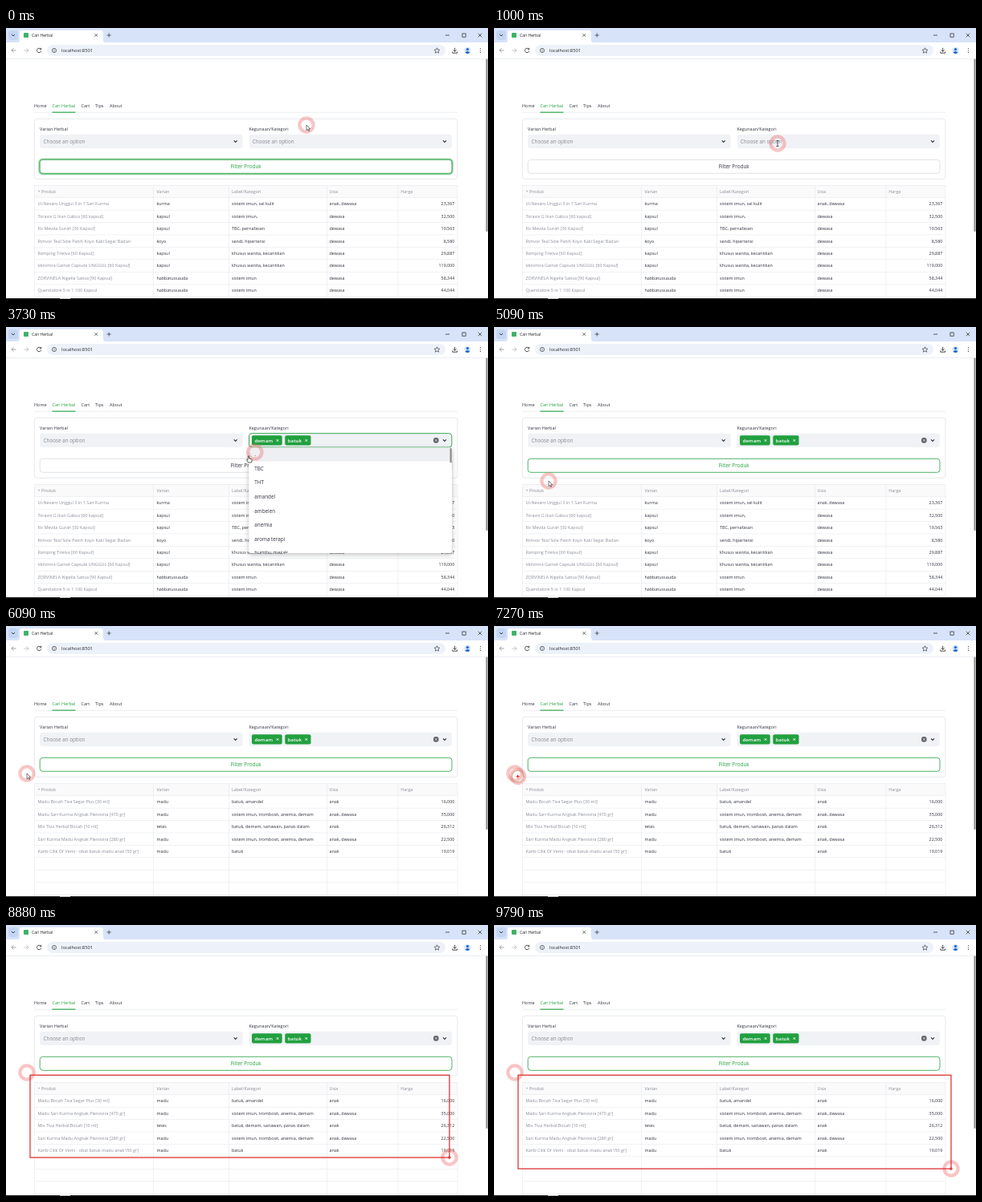
These frames come from a looping animation (600 by 338 pixels, 9.82 s). An HTML page:

```html
<!DOCTYPE html>
<html lang="id">
<head>
<meta charset="utf-8">
<title>Cari Herbal</title>
<style>
  html, body { margin: 0; width: 100%; height: 100%; overflow: hidden; background: #fff; }
  svg { display: block; }
  text { font-family: "Open Sans", "Noto Sans", sans-serif; white-space: pre; }
  #popup { filter: drop-shadow(0 2px 3px rgba(0, 0, 0, .25)); }
</style>
</head>
<body>
<svg id="stage" width="600" height="338" viewBox="0 0 600 338">
  <g id="browser"></g>
  <g id="page"></g>
  <g id="table"></g>
  <g id="button"></g>
  <g id="select"></g>
  <g id="popup"></g>
  <g id="overlay"></g>
</svg>
<script>
const LOOP = 9820;
const GREEN = '#22a03f', INK = '#31333f', MUTED = '#8b8e98', LINE = '#e6e8ec', FIELD = '#f0f2f6';
const CLICK_SELECT = 1000, PICK_FIRST = 2110, PICK_SECOND = 3010, CLICK_FILTER = 4330,
      RESULTS = 5600, PEN_ON = 6400, DRAG = 7270, LAG_FROM = 8240, LAG_TO = 8510;

const allProducts = [
  ['Ul-Nevaro Unggul 3 in 1 Sari Kurma', 'kurma', 'sistem imun, sel kulit', 'anak, dewasa', '23,367'],
  ['Toravix G Ikan Gabus [60 kapsul]', 'kapsul', 'sistem imun,', 'dewasa', '32,500'],
  ['Ro Mevda Gurah [30 Kapsul]', 'kapsul', 'TBC, pernafasan', 'dewasa', '19,563'],
  ['Rimvor Teal Sole Patch Koyo Kaki Segar Badan', 'koyo', 'sendi, hipertensi', 'dewasa', '8,580'],
  ['Ramping Tirelva [60 Kapsul]', 'kapsul', 'khusus wanita, kecantikan', 'dewasa', '29,887'],
  ['Velomira Gamat Capsule UNGGUL [60 Kapsul]', 'kapsul', 'khusus wanita, kecantikan', 'dewasa', '119,000'],
  ['ZORVINELA Nigella Sativa [90 Kapsul]', 'habbatussauda', 'sistem imun', 'dewasa', '58,344'],
  ['Quendalore 5 in 1 100 Kapsul', 'habbatussauda', 'sistem imun', 'dewasa', '44,044']
];
const filteredProducts = [
  ['Madu Bocah Tiva Segar Plus [30 ml]', 'madu', 'batuk, amandel', 'anak', '16,000'],
  ['Madu Sari Kurma Angkak Plenovira [470 gr]', 'madu', 'sistem imun, trombosit, anemia, demam', 'anak, dewasa', '35,000'],
  ['Mix Tiva Herbal Bocah [10 ml]', 'tetes', 'batuk, demam, sariawan, panas dalam', 'anak', '26,312'],
  ['Sari Kurma Madu Angkak Plenovira [280 gr]', 'madu', 'sistem imun, trombosit, anemia, demam', 'anak, dewasa', '22,500'],
  ['Karib Cilik Or Vemi - obat batuk madu anak150 gr]', 'madu', 'batuk', 'anak', '19,019']
];
const options = ['.', 'TBC', 'THT', 'amandel', 'ambeien', 'anemia', 'aroma terapi', 'batuk',
  'bumbu masak', 'demam', 'diabetes', 'hipertensi', 'kecantikan', 'sariawan', 'sendi'];

// Pointer path: time, x, y
const path = [
  [0, 374, 121], [300, 374, 121], [850, 353, 144], [3560, 353, 144], [3730, 310, 156],
  [3790, 302, 162], [4000, 290, 168], [4120, 274, 173], [4400, 274, 173], [5040, 68, 192],
  [5180, 68, 192], [5300, 36, 186], [5400, 26, 184], [7240, 26, 184], [7270, 29.5, 187.5],
  [7500, 60, 196], [8240, 485, 275], [8360, 494, 275], [8510, 494, 275], [8880, 552, 290],
  [9420, 569, 304], [LOOP, 569, 304]
];

const $ = id => document.getElementById(id);
const text = (x, y, s, size = 5.5, fill = INK, extra = '') =>
  `<text x="${x}" y="${y}" font-size="${size}" fill="${fill}" ${extra}>${s}</text>`;
const rect = (x, y, w, h, fill, extra = '') =>
  `<rect x="${x}" y="${y}" width="${w}" height="${h}" fill="${fill}" ${extra}/>`;
const stroke = (d, color, width = 1, extra = '') =>
  `<path d="${d}" fill="none" stroke="${color}" stroke-width="${width}" ${extra}/>`;
const circle = (x, y, r, fill, extra = '') =>
  `<circle cx="${x}" cy="${y}" r="${r}" fill="${fill}" ${extra}/>`;
const cross = (x, y, r, color, width) =>
  stroke(`M${x - r} ${y - r}l${2 * r} ${2 * r}M${x + r} ${y - r}l${-2 * r} ${2 * r}`, color, width);
const chevron = (x, y, r, color, width) =>
  stroke(`M${x - r} ${y - r / 2}l${r} ${r}l${r} ${-r}`, color, width);

function drawBrowser() {
  const dark = '#3c4043';
  $('browser').innerHTML =
    rect(0, 0, 600, 18, '#d7e3f9') +
    rect(3, 3, 12, 12, '#c3d5f3', 'rx="3"') + chevron(9, 9, 2, dark, 1) +
    `<path d="M14 18q3 0 3-3V6q0-3 3-3h98q3 0 3 3v9q0 3 3 3z" fill="#fff"/>` +
    rect(22, 6, 6, 6, '#3fb26a', 'rx="1"') +
    text(32, 11, 'Cari Herbal', 5, '#1f1f1f') +
    cross(112.3, 9, 1.8, dark, .8) +
    stroke('M125.7 9h5M128.2 6.5v5', dark, .8) +
    stroke('M547 9h5', '#222', .7) +
    rect(568, 7, 4.2, 4.2, 'none', 'stroke="#222" stroke-width=".7"') +
    cross(590, 9, 2.2, '#222', .7) +
    rect(0, 18, 600, 20, '#fff') +
    rect(51, 21, 496, 14, '#edf1f9', 'rx="7"') +
    stroke('M12.5 28h-5.5M9.5 25.3L6.8 28l2.7 2.7', '#8a8d91', .8) +
    stroke('M22.5 28h5.5M25.3 25.3L28 28l-2.7 2.7', '#b5b8bc', .8) +
    stroke('M43.3 26.3A2.7 2.7 0 1 0 43.8 28.6M43.8 24.8v2h-2', dark, .9) +
    circle(60, 28, 2.6, 'none', `stroke="${dark}" stroke-width=".7"`) +
    stroke('M60 27.6v1.8M60 26.2v.7', dark, .7) +
    text(69, 30, 'localhost:8501', 5.8, '#26282b') +
    stroke('M536.5 24.8l1 2.2 2.4.2-1.8 1.6.5 2.4-2.1-1.2-2.1 1.2.5-2.4-1.8-1.6 2.4-.2z', dark, .7) +
    stroke('M558.7 24.8v4.4M556.7 27.4l2 2 2-2M555.8 29.5v1.7h5.8v-1.7', '#333', .9) +
    circle(574.5, 28, 4, '#d2e3fc') + circle(574.5, 26.6, 1.6, '#1a66c9') +
    `<path d="M571.6 30.7q2.9-3.4 5.8 0q-2.9 2.4-5.8 0z" fill="#1a66c9"/>` +
    [25.6, 28, 30.4].map(y => circle(590.5, y, .6, dark)).join('') +
    rect(0, 38, 600, .7, '#e1e5ec');
}

function drawPage() {
  const nav = [[35, 'Home'], [57.5, 'Cari Herbal'], [93.5, 'Cart'], [111, 'Tips'], [129, 'About']];
  $('page').innerHTML =
    nav.map(([x, s], i) => text(x, 98.8, s, 5.5, i === 1 ? GREEN : INK)).join('') +
    rect(35, 104.8, 527, .8, '#e6e8ec') + rect(57.5, 104.6, 29, 1.1, GREEN) +
    rect(35.4, 113.3, 526.6, 75, 'none', 'rx="3.5" stroke="#dcdee3" stroke-width=".7"') +
    text(42, 127.8, 'Varian Herbal') + text(302.4, 127.8, 'Kegunaan/Kategori') +
    rect(42, 132.7, 252.7, 17.4, FIELD, 'rx="3.5"') +
    text(46.6, 143.6, 'Choose an option', 6.3, '#85878f') +
    chevron(285.7, 141.3, 2, INK, 1.2) +
    rect(597.4, 38.5, 2.2, 215.5, '#8e8e8e', 'rx="1"') +
    rect(0, 337, 600, 1, '#202124') + rect(67, 337, 13, 1, '#b9bcc0');
}

function drawTable(rows) {
  const top = 196, pitch = 15.42, left = [39.5, 187.4, 281, 402.5, 491.3];
  const heads = ['+ Produk', 'Varian', 'Label/Kategori', 'Usia', 'Harga'];
  let out = rect(35.3, top, 526.7, pitch, '#fafafb');
  for (let i = 0; i < 10; i++) out += rect(35.3, top + i * pitch, 526.7, .6, LINE);
  for (const x of [35.3, 183.4, 277.4, 399, 487.7, 561.7]) out += rect(x, top, .6, 141, LINE);
  heads.forEach((s, i) => out += text(left[i], 205.8, s, 5.4, MUTED));
  rows.forEach((row, r) => row.forEach((s, c) => {
    const y = +(221.3 + r * pitch).toFixed(1);
    out += c === 4 ? text(558.3, y, s, 5.4, INK, 'text-anchor="end"')
                   : text(left[c], y, s, 5.4, c ? INK : MUTED);
  }));
  $('table').innerHTML = out;
}

function drawButton(mode) {
  const on = mode !== 'idle';
  $('button').innerHTML =
    (mode === 'ring' ? rect(41.6, 163.6, 514, 18.4, 'none',
      `rx="4" stroke="${GREEN}" stroke-opacity=".5" stroke-width="2.4"`) : '') +
    rect(42.2, 164.3, 512.8, 17, '#fff', `rx="3.5" stroke="${on ? GREEN : '#d8dade'}" stroke-width=".8"`) +
    text(298.7, 175.2, 'Filter Produk', 6.4, on ? GREEN : INK, 'text-anchor="middle"');
}

function chip(x, w, s) {
  return rect(x, 135.2, w, 12.4, GREEN, 'rx="2"') +
    text(x + 3.5, 143.6, s, 6.1, '#fff', 'font-weight="600"') +
    cross(x + w - 5.7, 141.5, 1.3, '#fff', .9);
}

function drawSelect(open, query, chips) {
  const inputX = [306, 347.5, 383.5][chips];
  let out = rect(302.5, 132.7, 252.4, 17.4, FIELD,
    open ? `rx="3.5" stroke="${GREEN}" stroke-width=".9"` : 'rx="3.5"');
  if (chips > 0) out += chip(306, 37.7, 'demam');
  if (chips > 1) out += chip(347.3, 32.2, 'batuk');
  if (!chips && !query) out += text(306.8, 143.6, 'Choose an option', 6.3, '#85878f');
  if (query) out += text(inputX, 143.6, query, 6.3, INK, 'id="query"');
  if (chips || query) out += circle(535.3, 141.4, 3.3, '#5d5f68') + cross(535.3, 141.4, 1.2, '#fff', .8);
  out += chevron(546, 141.3, 2, INK, 1.2);
  $('select').innerHTML = out;
  if (query) {
    const caret = inputX + $('query').getComputedTextLength() + .3;
    $('select').innerHTML += rect(caret, 137.3, .6, 8.2, INK);
  }

  const taken = ['demam', 'batuk'].slice(0, chips);
  const items = options.filter(o => o.includes(query) && !taken.includes(o)).slice(0, 8);
  const pitch = 17.6, height = Math.min(131.5, items.length * pitch - .4);
  $('popup').innerHTML = !open ? '' :
    rect(302.3, 150.6, 252.7, height, '#fff', 'rx="2"') +
    `<svg x="302.3" y="150.6" width="252.7" height="${height}" overflow="hidden">` +
    rect(0, 0, 252.7, 17, '#eeeff2') +
    items.map((s, i) => text(7, 10.6 + i * pitch, s, 6.3)).join('') +
    (items.length > 7 ? rect(250.3, .6, 2.2, 18, '#8e8e8e') : '') + '</svg>';
}

function pointAt(t) {
  let i = 1;
  while (i < path.length - 1 && path[i][0] < t) i++;
  const [t0, x0, y0] = path[i - 1], [t1, x1, y1] = path[i];
  const k = Math.min(1, (t - t0) / (t1 - t0));
  return [x0 + (x1 - x0) * k, y0 + (y1 - y0) * k];
}

const halo = (x, y) => circle(x, y, 8.6, 'none', 'stroke="#ee6e6e" stroke-opacity=".4" stroke-width="4.2"');

function pointer(t) {
  const [x, y] = pointAt(Math.min(t + 60, LOOP));
  let shape;
  if (t > 850 && t < 3560)
    shape = stroke('M-1.5-3.5h3M0-3.5v7M-1.5 3.5h3', '#222', .7);
  else if (t >= 3560 && t < 4600)
    shape = `<path d="M-.6-1q.8-.8 1.3 0v3l3 .7q.8.3.6 1.3l-.7 3h-3.8l-2.2-3q0-1 1.4-.2z" fill="#fff" stroke="#222" stroke-width=".7"/>`;
  else
    shape = `<path d="M0 0v6.6l1.6-1.4 1.1 2.4 1-.5-1.1-2.3h2.1z" fill="#fff" stroke="#222" stroke-width=".6"/>`;
  return `<g transform="translate(${x} ${y})">${shape}</g>`;
}

function drawOverlay(t) {
  const [x, y] = pointAt(t);
  let out = '';
  if (t >= DRAG) {
    out += halo(26, 184);
    if (t < DRAG + 90) out += circle(x, y, 7.5, 'none', 'stroke="#7cc47f" stroke-opacity=".45" stroke-width="1.6"');
  }
  out += halo(x, y);
  if (t >= DRAG + 30) {
    const [rx, ry] = t < LAG_TO ? pointAt(Math.min(t, LAG_FROM)) : [x, y];
    out += rect(30, 187.2, Math.max(0, rx - 30), Math.max(0, ry - 187.2), 'none', 'stroke="#e02626" stroke-width="1.2"');
  }
  out += t < PEN_ON ? pointer(t) : stroke(`M${x - 2} ${y}h4M${x} ${y - 2}v4`, '#e02626', 1.1);
  $('overlay').innerHTML = out;
}

const typed = (word, from, to, t) =>
  t < from ? '' : word.slice(0, 1 + Math.floor((word.length - 1) * Math.min(1, (t - from) / (to - from))));

const shown = {};
function update(name, draw, ...args) {
  const key = args.join('|');
  if (shown[name] === key) return;
  shown[name] = key;
  draw(...args);
}

function render(t) {
  const open = t >= CLICK_SELECT + 30 && t < CLICK_FILTER;
  const chips = (t >= PICK_FIRST) + (t >= PICK_SECOND);
  const query = [typed('demam', 1150, 1690, t), typed('batuk', 2450, 2810, t), ''][chips];
  update('button', drawButton, t < CLICK_SELECT ? 'ring' : t < CLICK_FILTER ? 'idle' : 'focus');
  update('select', drawSelect, open, query, chips);
  update('table', done => drawTable(done ? filteredProducts : allProducts), t >= RESULTS);
  drawOverlay(t);
}

drawBrowser();
drawPage();
const start = performance.now();
function frame() {
  render((performance.now() - start) % LOOP);
  requestAnimationFrame(frame);
}
frame();
</script>
</body>
</html>
```
